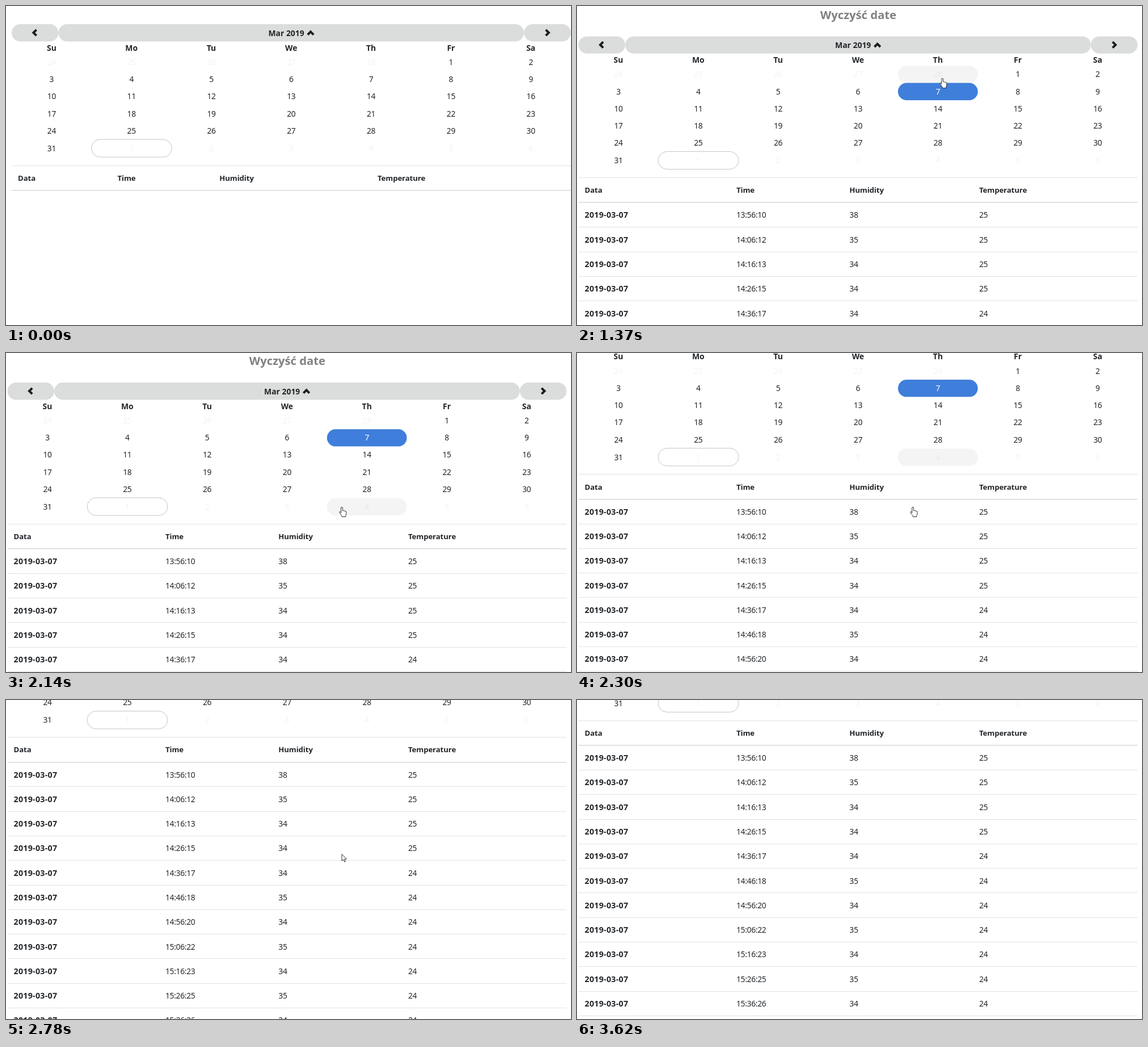
Write an HTML page with a canvas that moves like this. It is 996 px wide and 562 px high and loops after 4.2 s.

```html
<!DOCTYPE html>
<html lang="pl">
<head>
<meta charset="utf-8">
<title>Calendar</title>
<style>
html, body { margin: 0; width: 100%; height: 100%; overflow: hidden; background: #fff; }
canvas { display: block; }
</style>
</head>
<body>
<canvas id="stage" width="996" height="562"></canvas>
<script>
const ctx = document.getElementById('stage').getContext('2d');
const LOOP = 4200, ENTER = 130, CLICK = 1200, SETTLED = 2590, GONE = 3590;
const TICK = 77.1; // screen refresh interval
const WIDTH = 985.6, COL = WIDTH / 7, ROW = 30.2, PILL = 30.4, LINE = 43.28;
const INK = '#212529', FAINT = 'rgba(0,0,0,.05)';
const FONT = '"Noto Sans", "Open Sans", sans-serif';
const STYLES = {
  num: [`13.8px ${FONT}`, '-0.3px'],
  word: [`bold 13.2px ${FONT}`, '-0.1px'],
  month: [`bold 13.9px ${FONT}`, '0px'],
  date: [`bold 14.2px ${FONT}`, '0.28px'],
  title: [`bold 20.2px ${FONT}`, '0px']
};

const HOME = { x: 866, y: 522 };
const MOVES = [
  { from: ENTER, to: 590, x: 656, y: 231 },
  { from: 590, to: 1130, x: 644, y: 127.5 },
  { from: 1370, to: 1990, x: 592, y: 271.5 },
  { from: 3000, to: 3540, x: 791, y: 556 }
];
const NOTCH = 88.75, NOTCH_TIME = 170, NOTCHES = [2122, 2336, 2647];

const HAND = new Path2D('M-1.4 10V1.4a1.4 1.4 0 0 1 2.8 0V6.2q1.4-.9 2.3.4 1.5-.7 2.2.5 1.9-.3 1.9 1.6v3q0 2-1.2 3.4V17H.2v-1.6Q-1.4 14-2.6 11.6l-1.6-2.3q-.3-1.5 1.2-1.3Z');
const ARROW = new Path2D('M0 0V12L2.7 9.5 4.6 13.7 6.4 12.9 4.5 8.8H8.3Z');

const clamp = v => Math.min(1, Math.max(0, v));
const easeOut = f => f * (2 - f);
const smooth = f => f * f * (3 - 2 * f);
const pad = n => String(Math.floor(n)).padStart(2, '0');

function pointerAt(t) {
  return MOVES.reduce((p, m) => {
    const f = easeOut(clamp((t - m.from) / (m.to - m.from)));
    return { x: p.x + (m.x - p.x) * f, y: p.y + (m.y - p.y) * f };
  }, HOME);
}

function scrollAt(t) {
  return NOTCHES.reduce((sum, s) => sum + NOTCH * smooth(clamp((t - s) / NOTCH_TIME)), 0);
}

// One sensor reading roughly every ten minutes.
function reading(i) {
  const s = 50170 + Math.round(i * 601.645);
  return {
    clock: [s / 3600, s / 60 % 60, s % 60].map(pad).join(':'),
    humidity: 34 + Math.floor(4 / (1 + 3 * i)) + (i > 3 ? i % 2 : 0),
    temperature: i < 4 ? 25 : 24
  };
}

function text(s, x, y, style, color = INK, align = 'left') {
  [ctx.font, ctx.letterSpacing] = STYLES[style];
  ctx.fillStyle = color;
  ctx.textAlign = align;
  ctx.fillText(s, x, Math.round(y));
}

function pill(x, y, w, h, fill, stroke) {
  ctx.beginPath();
  ctx.roundRect(x, y, w, h, h / 2);
  if (fill) { ctx.fillStyle = fill; ctx.fill(); }
  if (stroke) { ctx.strokeStyle = stroke; ctx.lineWidth = 1; ctx.stroke(); }
}

function chevron(x, y, turn) {
  ctx.save();
  ctx.translate(x, y);
  ctx.rotate(turn);
  ctx.beginPath();
  ctx.moveTo(-5.2, 2.6);
  ctx.lineTo(0, -2.6);
  ctx.lineTo(5.2, 2.6);
  ctx.lineWidth = 4;
  ctx.strokeStyle = '#1b1d1f';
  ctx.stroke();
  ctx.restore();
}

function rule(x, y, h, color) {
  ctx.fillStyle = color;
  ctx.fillRect(x, Math.round(y), WIDTH, h);
}

function drawBar(x, y) {
  const side = 82.4;
  for (const [dx, w] of [[0, side], [side, WIDTH - 2 * side], [WIDTH - side, side]])
    pill(x + dx, y, w, PILL, '#dbdddc');
  chevron(x + 41, y + 15, -Math.PI / 2);
  chevron(x + 944.2, y + 15, Math.PI / 2);
  chevron(x + 527, y + 16, 0);
  text('Mar 2019', x + 452.5, y + 20.5, 'month');
}

function drawDays(x, y, hover, picked) {
  ['Su', 'Mo', 'Tu', 'We', 'Th', 'Fr', 'Sa'].forEach((d, i) =>
    text(d, x + (i + 0.5) * COL, y + 46.6, 'month', INK, 'center'));
  for (let i = 0; i < 42; i++) {
    const col = i % 7, row = Math.floor(i / 7), day = i - 4;
    const cx = x + (col + 0.5) * COL;
    const cy = y + 67 + row * ROW + (row === 5 ? 0.8 : 0);
    const outside = day < 1 || day > 31;
    const chosen = picked && day === 7;
    if (chosen || i === hover)
      pill(cx - COL / 2, cy - PILL / 2 + 0.2, COL, PILL, chosen ? '#3f7edb' : '#f4f4f4');
    if (day === 32)
      pill(cx - COL / 2 - 0.3, cy - 15.8, COL + 1, 31.2, null, '#c4c4c4');
    const label = day < 1 ? day + 28 : day > 31 ? day - 31 : day;
    text(label, cx, cy + 5, 'num', chosen ? '#fff' : outside ? FAINT : INK, 'center');
  }
}

function drawTable(x, y, filled) {
  const cols = filled ? [13.5, 281, 480.3, 709] : [21, 196.5, 376.3, 655];
  rule(x, y + 248.6, 1, '#dee2e6');
  ['Data', 'Time', 'Humidity', 'Temperature'].forEach((s, i) =>
    text(s, cols[i], y + 275.8, 'word'));
  rule(x, y + 292, 1.6, '#d9dce0');
  if (!filled) return;
  for (let i = 0; i < 12; i++) {
    const line = y + 292.6 + (i + 1) * LINE;
    const base = line - 15.9;
    const { clock, humidity, temperature } = reading(i);
    text('2019-03-07', cols[0], base, 'date');
    [clock, humidity, temperature].forEach((v, k) => text(v, cols[k + 1], base, 'num'));
    rule(x, line, 1, '#dee2e6');
  }
}

function drawPointer(p, shape) {
  ctx.save();
  ctx.translate(p.x, p.y);
  ctx.fillStyle = '#fff';
  ctx.fill(shape);
  ctx.strokeStyle = '#25252b';
  ctx.lineWidth = 0.95;
  ctx.lineJoin = 'round';
  ctx.stroke(shape);
  ctx.restore();
}

function cellAt(p, x, y) {
  const col = Math.floor((p.x - x) / COL), row = Math.floor((p.y - y - 52) / ROW);
  return col >= 0 && col < 7 && row >= 0 && row < 6 ? row * 7 + col : -1;
}

function draw(now) {
  const time = now % LOOP;
  const t = ENTER + TICK * Math.floor((time - ENTER) / TICK);
  const filled = t >= CLICK;
  const x = filled ? 2.6 : 10;
  const top = filled ? 53.4 : 32;
  const y = top - scrollAt(t);
  const shown = t >= ENTER && t < GONE;
  const pointer = pointerAt(t);
  // The hovered cell is only re-evaluated once scrolling settles.
  const cell = shown ? cellAt(pointer, x, t < SETTLED ? top : y) : -1;

  ctx.fillStyle = '#fff';
  ctx.fillRect(0, 0, 996, 562);
  if (filled) text('Wyczyść date', 495.8, y - 30.8, 'title', '#808080', 'center');
  drawBar(x, y);
  drawDays(x, y, cell, filled);
  drawTable(x, y, filled);
  if (shown) drawPointer(pointer, cell < 0 ? ARROW : HAND);
}

const start = performance.now();
function frame() {
  draw(performance.now() - start);
  requestAnimationFrame(frame);
}
frame();
</script>
</body>
</html>
```
